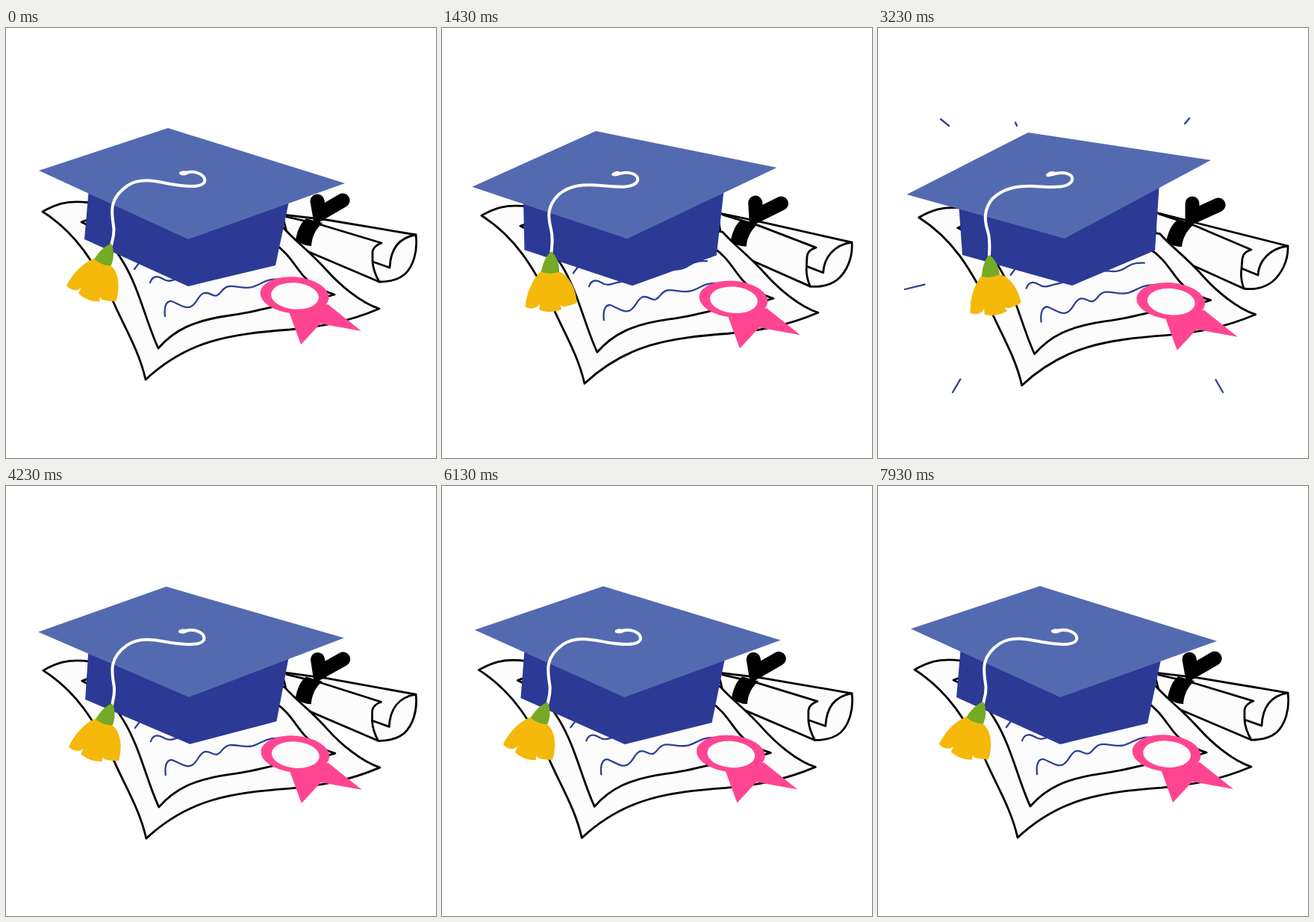
These frames come from a looping animation (576x576 px, 8000 ms). An HTML page:

```html
<!DOCTYPE html>
<html lang="en">
<head>
<meta charset="utf-8">
<title>Graduation cap</title>
<style>
  html, body { margin: 0; width: 100%; height: 100%; overflow: hidden; background: #fff; }
  svg { display: block; width: 100%; height: 100%; }
  .ink { fill: none; stroke: #000; stroke-width: 2.8; stroke-linejoin: round; stroke-linecap: round; }
  .sheet { fill: #fcfcfc; }
  .pen { fill: none; stroke: #2d4094; stroke-width: 2.3; stroke-linecap: round; }
  .pink { fill: #ff4592; }
  .board { fill: #546ab0; }
  .band { fill: #2c3a96; }
  .cord { fill: none; stroke: #fff; stroke-width: 4; stroke-linecap: round; }
  .bow { fill: none; stroke: #000; stroke-width: 19; stroke-linecap: round; }
</style>
</head>
<body>
<svg viewBox="0 0 576 576">
  <g id="sparks"></g>
  <g id="roll"></g>
  <g id="paper">
    <path class="ink sheet" d="M49 246C65 237 80 230 112 234L372 268C390 288 406 298 430 325C447 344 475 368 500 376C455 395 420 400 380 404C300 410 244 418 187 471C178 430 155 395 140 358C118 316 95 275 49 246Z"/>
    <path class="ink" d="M109 257L101 260C120 268 138 282 156 312C178 347 188 395 204 429C225 405 250 392 300 385C340 380 365 370 405 363Q425 362 440 357Q424 352 413 345C390 330 385 305 358 288"/>
    <path class="pen" d="M213 386C211 368 218 365 222 366C232 370 241 377 248 373C256 369 257 358 265 355C273 353 277 361 283 358C290 354 290 347 299 346C309 345 318 350 330 347C342 343 350 335 366 337"/>
    <path class="pen" d="M193 341C197 330 205 333 210 336C218 341 222 338 230 336C250 332 270 322 293 318C305 316 312 323 328 312C338 306 345 307 351 307M172 323L178 315"/>
    <path class="pink" d="M379 380L395 424L421 396L476 406L431 370Z"/>
    <ellipse class="pink" cx="386.5" cy="358" rx="46" ry="24.5" transform="rotate(5 386.5 358)"/>
    <ellipse class="sheet" cx="387" cy="359" rx="32" ry="17.7" transform="rotate(5 387 359)"/>
  </g>
  <g id="cap"></g>
  <g id="tassel">
    <path fill="#f4b90b" d="M137 331C126 342 119 360 118 380Q127 384 134 379L137 375L137 383Q152 388 167 381L165 375L169 377Q178 376 187 371C184 350 174 335 161 331Z"/>
    <path fill="#74aa26" d="M149 304C142 310 138 322 137 332Q149 336 161 331C161 322 157 310 149 304Z"/>
  </g>
</svg>
<script>
const NS = 'http://www.w3.org/2000/svg';
const PERIOD = 2000;
const $ = id => document.getElementById(id);
const clamp = v => Math.max(0, Math.min(1, v));

function addPath(parent, cls) {
  const el = document.createElementNS(NS, 'path');
  el.setAttribute('class', cls);
  $(parent).append(el);
  return el;
}

// Paths that bend between a raised and a lowered pose: [layer, class, raised, lowered]
const morphs = [
  ['roll', 'ink sheet',
    'M370 250L430 257L549 277C552 300 545 320 534 330Q522 340 500 340L380 289Z',
    'M368 246L430 262L549 292C550 312 540 330 528 340Q512 352 490 349L375 297Z'],
  ['roll', 'ink',
    'M376 253L420 263L503 288Q492 292 491 300L491 313L514 321C515 298 525 281 549 277M491 313Q492 326 500 340',
    'M376 249L425 265L500 297Q489 300 488 309L487 322L509 331C510 312 525 295 549 292M487 322Q485 335 490 349'],
  ['roll', '',
    'M402 255Q412 258 424 261C414 270 410 280 409 292Q398 292 388 284C390 272 394 262 402 255Z',
    'M400 258Q410 261 422 264C412 273 408 283 407 293Q396 293 386 287C388 275 392 265 400 258Z'],
  ['roll', 'bow',
    'M417 232L420 249L451 231',
    'M421 235L421 253L456 237'],
  ['cap', 'band',
    'M111 215L105 283L244 346L361 318L380 228Z',
    'M108 234L113 304L260 345L371 298L377 207Z'],
  ['cap', 'board',
    'M44 191L217 134L454 208L244 283Z',
    'M38.5 223L201 140L446 177L250 282Z'],
  ['cap', 'cord',
    'M240 194C256 190 268 198 266 206C262 215 238 212 220 209C200 205 180 200 163 211C138 228 141 246 144 265C146 277 142 285 141 291',
    'M234 196C250 191 262 196 260 204C255 216 232 213 210 212C188 211 168 214 153 229C142 243 142 256 147 272C151 285 149 298 149 306'],
  ['cap', 'cord',
    'M234 194.5Q238 192 242 194.5Q238 196.5 234 194.5',
    'M227 197Q231 193 236 194.5Q232 198 227 197']
].map(([layer, cls, from, to]) => ({ el: addPath(layer, cls), from, to: to.match(/[\d.]+/g) }));

// Short accent strokes, each from its first point outwards
const sparks = [
  [112, 145, 84, 122], [181, 120, 186, 131], [402, 139, 417, 121],
  [102, 334, 36, 350], [126, 444, 100, 488], [438, 446, 462, 488]
].map(line => ({ el: addPath('sparks', 'pen'), line }));

const mix = (a, b, k) => a + (b - a) * k;

function blend(from, to, k) {
  let i = 0;
  return from.replace(/[\d.]+/g, n => mix(+n, +to[i++], k).toFixed(2));
}

// Eased swing 0 -> 1 -> 0 over one period
function swing(t) {
  const x = ((t + PERIOD) % PERIOD) / (PERIOD / 2);
  const u = x > 1 ? 2 - x : x;
  return u < .5 ? 2 * u * u : 1 - 2 * (1 - u) ** 2;
}

function draw(t) {
  const k = swing(t) / .875;
  for (const m of morphs) m.el.setAttribute('d', blend(m.from, m.to, k));
  $('paper').setAttribute('transform', `translate(${5.7 * k} ${7.7 * k})`);

  // The tassel trails slightly behind the cap
  const angle = 25 * (1 - swing(t - 65) / .8);
  $('tassel').setAttribute('transform',
    `translate(${mix(-8, 0, k)} ${mix(-15, 0, k)}) rotate(${angle} 149 304)`);

  const head = clamp((t - 740) / 60) ** 2;
  const tail = clamp((t - 1100) / 250);
  for (const { el, line: [x1, y1, x2, y2] } of sparks) {
    const at = f => `${mix(x1, x2, f)} ${mix(y1, y2, f)}`;
    el.setAttribute('d', head > tail ? `M${at(tail)}L${at(head)}` : '');
  }
}

// Twenty even poses a second, shown in alternating short and long beats
const start = performance.now();
function tick(now) {
  const t = Math.max(0, now - start) % PERIOD;
  const beat = t % 100;
  draw(t - beat + (beat >= 30 ? 50 : 0));
  requestAnimationFrame(tick);
}
draw(0);
requestAnimationFrame(tick);
</script>
</body>
</html>
```
